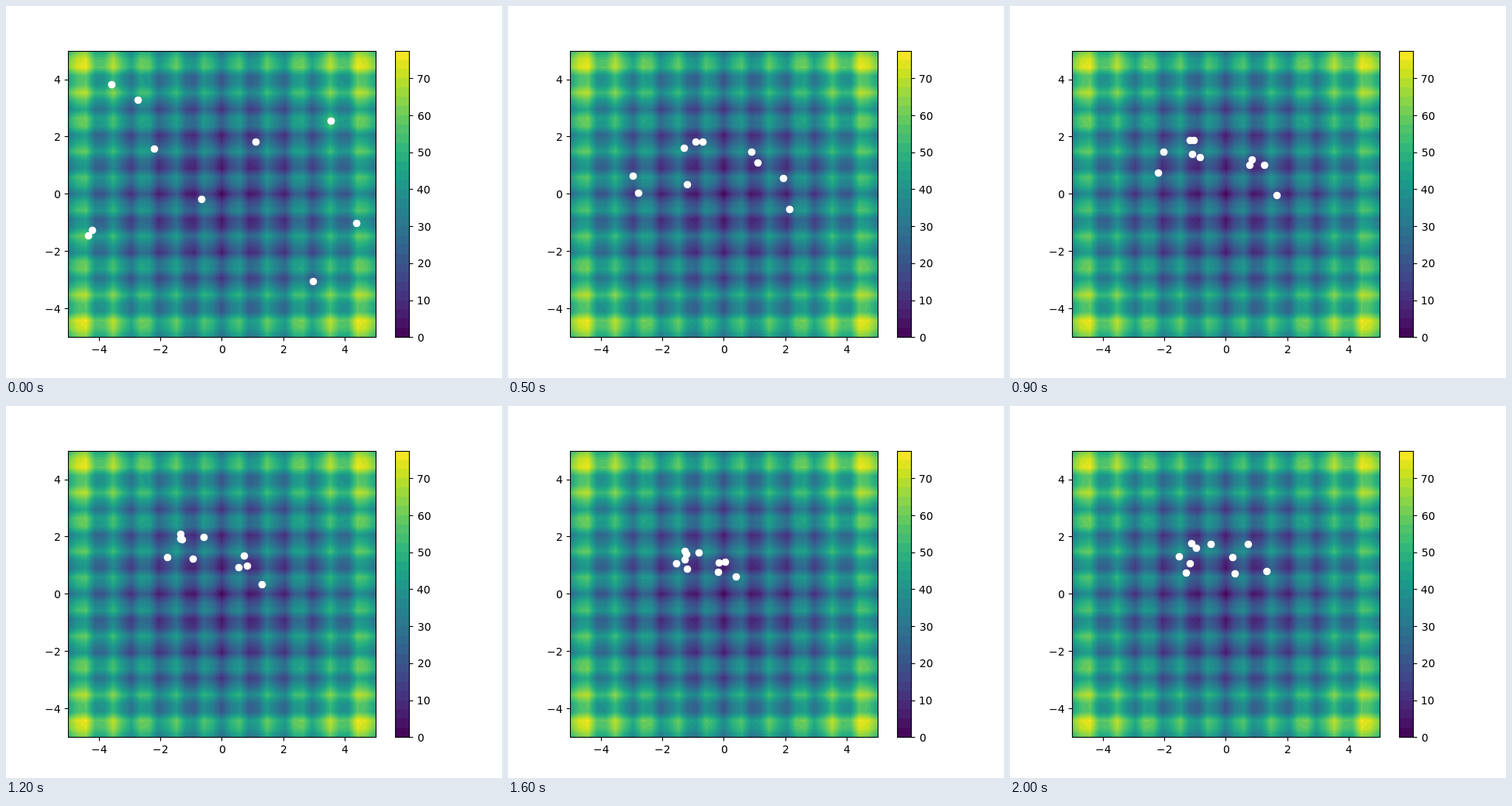
An HTML page with a canvas that plays this animation: 640x480 px, repeating every 2.1 s.

```html
<!DOCTYPE html>
<html lang="en">
<head>
<meta charset="utf-8">
<title>Particle swarm on the Rastrigin function</title>
<style>
html, body { margin: 0; width: 100%; height: 100%; overflow: hidden; background: #fff; }
canvas { position: absolute; left: 0; top: 0; }
</style>
</head>
<body>
<canvas id="plot" width="640" height="480"></canvas>
<canvas id="swarm" width="640" height="480"></canvas>
<script>
const plot = document.getElementById('plot').getContext('2d');
const swarm = document.getElementById('swarm').getContext('2d');

const LEFT = 80, TOP = 57.6, WIDTH = 396.8, HEIGHT = 369.6, BOTTOM = TOP + HEIGHT;
const BAR_RIGHT = 520.08;
const BANDS = 31, BAND_STEP = 2.5;
const GRID = 10 / 34;   // sample spacing of the surface
const FONT_SIZE = 13.889;

const viridis = ('440154 481a6c 472f7d 414487 39568c 31688e 2a788e 23888e ' +
  '1f988b 22a884 35b779 54c568 7ad151 a5db36 d2e21b fde725').split(' ')
  .map(hex => [0, 2, 4].map(i => parseInt(hex.substr(i, 2), 16)));

const mix = (a, b, part) => a + (b - a) * part;

function bandColor(band) {
  const at = (band + 0.5) / BANDS * (viridis.length - 1), k = Math.floor(at);
  return `rgb(${viridis[k].map((v, i) => Math.round(mix(v, viridis[k + 1][i], at - k)))})`;
}
const colors = Array.from({ length: BANDS }, (_, i) => bandColor(i));

const rastrigin = v => 10 + v * v - 10 * Math.cos(2 * Math.PI * v);

// One axis of the surface, linear between grid samples
function sampled(v) {
  const k = Math.floor(v / GRID);
  return mix(rastrigin(k * GRID), rastrigin((k + 1) * GRID), v / GRID - k);
}

const toX = v => LEFT + WIDTH * (v + 5) / 10;
const toY = v => BOTTOM - HEIGHT * (v + 5) / 10;
const toBar = v => BOTTOM - HEIGHT * v / (BANDS * BAND_STEP);
const snap = v => Math.round(v) + 0.5;

function drawSurface() {
  const rows = [];
  for (let y = 58; y < 428; y++) rows.push(sampled((BOTTOM - y - 0.5) / HEIGHT * 10 - 5));
  for (let x = 80; x < 477; x++) {
    const gx = sampled((x + 0.5 - LEFT) / WIDTH * 10 - 5);
    rows.forEach((gy, i) => {
      const band = Math.floor((gx + gy) / BAND_STEP);
      plot.fillStyle = colors[Math.max(0, Math.min(BANDS - 1, band))];
      plot.fillRect(x, 58 + i, 1, 1);
    });
  }
}

function drawBar() {
  colors.forEach((color, i) => {
    const low = Math.round(toBar(i * BAND_STEP)), high = Math.round(toBar((i + 1) * BAND_STEP));
    plot.fillStyle = color;
    plot.fillRect(502, high, 18, low - high);
  });
}

function line(x, y, dx, dy) {
  plot.beginPath();
  plot.moveTo(x, y);
  plot.lineTo(x + dx, y + dy);
  plot.stroke();
}

function setFont(size) {
  plot.font = size + 'px "DejaVu Sans", sans-serif';
}

// Puts the ink on whole pixels; anchor is 0 for left, 0.5 for centre, 1 for right
function label(value, x, y, anchor) {
  const text = String(value).replace('-', '\u2212');
  setFont(1000);
  const size = plot.measureText(text), scale = FONT_SIZE / 1000;
  const bearing = -size.actualBoundingBoxLeft * scale;
  const left = x - anchor * size.width * scale;
  setFont(FONT_SIZE);
  plot.fillText(text, Math.round(left + bearing) - Math.floor(bearing), Math.round(y));
}

function drawAxes() {
  const tick = 4.86, gap = 9.72, middle = 5.5;
  plot.strokeStyle = plot.fillStyle = '#000';
  plot.lineWidth = 1.11;
  plot.strokeRect(80.5, 58.5, 397, 369);
  plot.strokeRect(502.5, 58.5, 18, 369);
  for (let v = -4; v <= 4; v += 2) {
    line(snap(toX(v)), 427.5, 0, tick);
    label(v, toX(v), 448, 0.5);
    line(80.5, snap(toY(v)), -tick, 0);
    label(v, LEFT - gap, toY(v) + middle, 1);
  }
  for (let v = 0; v <= 70; v += 10) {
    line(520.5, snap(toBar(v)), tick, 0);
    label(v, BAR_RIGHT + gap, toBar(v) + middle, 0);
  }
}

// Key poses of the swarm: x, y of each particle
const poses = [
  { step: 0, at: [136, 101, 170, 121, 191, 184, 106, 296, 111, 289, 252, 249, 322, 175, 419, 148, 452, 280, 396, 355] },
  { step: 5, at: [227, 183, 242, 175, 251, 175, 168, 241, 161, 219, 231, 230, 314, 188, 322, 202, 355, 222, 363, 262] },
  { step: 12, at: [241, 197, 225, 171, 227, 172, 208, 195, 225, 165, 255, 169, 311, 206, 300, 208, 307, 193, 330, 230] },
  { step: 20, at: [227, 215, 240, 183, 232, 203, 218, 194, 234, 177, 259, 178, 307, 178, 290, 216, 287, 195, 331, 213] }
];
const BEST = [225, 218], PULL = 0.35;

// Glides between poses; once gathered, the swarm swings towards its best spot and back
function swarmAt(step) {
  const next = Math.max(1, poses.findIndex(p => p.step >= step));
  const from = poses[next - 1], to = poses[next];
  const part = (step - from.step) / (to.step - from.step);
  const pull = next === poses.length - 1 ? PULL * Math.sin(Math.PI * part) : 0;
  return from.at.map((v, i) => snap(mix(mix(v, to.at[i], part), BEST[i % 2], pull)));
}

drawSurface();
drawBar();
drawAxes();

const start = performance.now();
function frame() {
  const step = Math.floor((performance.now() - start) % 2100 / 100);
  const dots = swarmAt(step);
  swarm.clearRect(0, 0, 640, 480);
  swarm.fillStyle = '#fff';
  for (let i = 0; i < dots.length; i += 2) {
    swarm.beginPath();
    swarm.arc(dots[i], dots[i + 1], 4.86, 0, 2 * Math.PI);
    swarm.fill();
  }
  requestAnimationFrame(frame);
}
frame();
</script>
</body>
</html>
```
